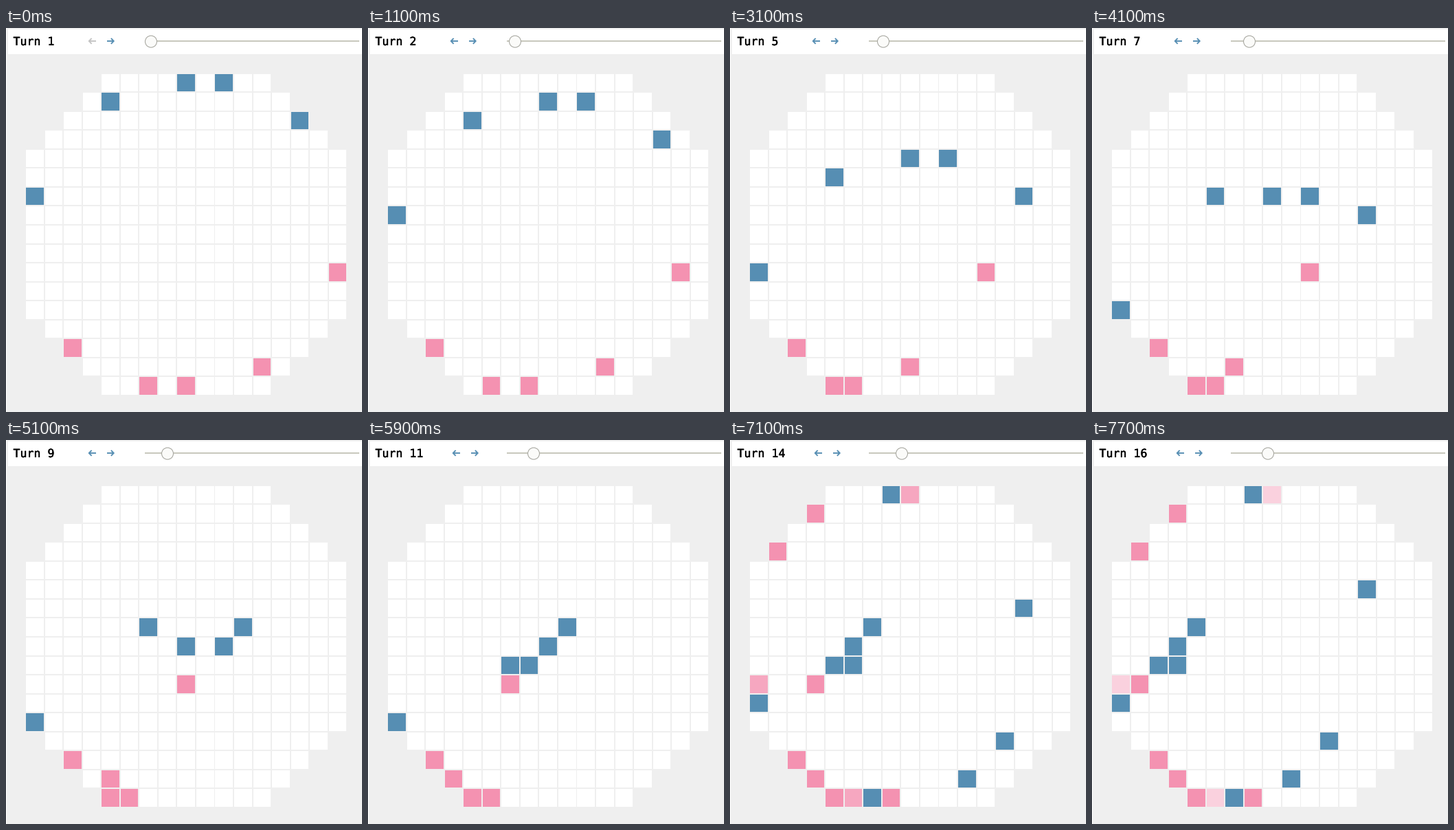
A matplotlib script that plays this animation: 518x558 px, repeating every 8 s.

```python
import matplotlib.pyplot as plt
import matplotlib.patheffects as pe
from matplotlib.animation import FuncAnimation
from matplotlib.collections import PolyCollection
from matplotlib.colors import to_rgb
from matplotlib.patches import Circle, Rectangle

W, H, DPI = 518, 558, 64
PX = 72 / DPI  # points per pixel
STEP_MS, LOOP_MS = 100, 8000
TURN_STARTS = [0, 1100, 1800, 2600, 3100, 3600, 4100, 4600,
               5100, 5500, 5900, 6300, 6700, 7100, 7400, 7700]

GREY, BLUE, PINK = "#efefef", "#568eb3", "#f492b1"
FADED, TRACK = "#c4c4c4", "#c8c8bd"
PITCH, CELL = 27.55, 25.55
LEFT, TOP, SIZE = 29, 66.6, 17

MOVES = {"L": (-1, 0), "R": (1, 0), "U": (0, -1), "D": (0, 1), ".": (0, 0)}

# colour, first turn, column, row, one move per turn, under attack
ROBOTS = [
    (BLUE, 1, 8, 0, "DDDDDDDDDL.LLLL", False),
    (BLUE, 1, 10, 0, "DDDDDDDDLLLLLLL", False),
    (BLUE, 1, 4, 1, "DDDDDRRDDD.LLLL", False),
    (BLUE, 1, 14, 2, "DDDDDLLLLLLLLLL", False),
    (BLUE, 1, 0, 6, "DDDDDD.....U", False),
    (PINK, 1, 16, 10, "L" * 15, False),
    (PINK, 1, 2, 14, "", False),
    (PINK, 1, 12, 15, "L" * 9, False),
    (PINK, 1, 6, 16, "LL", False),
    (PINK, 1, 8, 16, "LLL", True),
    (BLUE, 12, 7, 0, "", False),
    (BLUE, 12, 16, 6, "LLLU", False),
    (BLUE, 12, 15, 13, "LLLL", False),
    (BLUE, 12, 13, 15, "LLLL", False),
    (BLUE, 12, 7, 16, "L", False),
    (PINK, 12, 9, 0, "L", True),
    (PINK, 12, 3, 1, "", False),
    (PINK, 12, 1, 3, "", False),
    (PINK, 12, 0, 10, "", True),
    (PINK, 12, 9, 16, "LL", False),
]

fig = plt.figure(figsize=(W / DPI, H / DPI), dpi=DPI, facecolor="white")
ax = fig.add_axes([0, 0, 1, 1])
ax.set_xlim(0, W)
ax.set_ylim(H, 0)
ax.axis("off")


def box(x, y, w, h, color):
    ax.add_patch(Rectangle((x, y), w, h, color=color, lw=0, antialiased=False))


def in_arena(col, row):
    inset = max(0, 4 - row, row - 12)
    return inset <= col < SIZE - inset


def cell_corners(col, row):
    x, y = LEFT + col * PITCH, TOP + row * PITCH
    x0, x1, y0, y1 = map(round, (x, x + CELL, y, y + CELL))
    return [(x0, y0), (x1, y0), (x1, y1), (x0, y1)]


def arrow():
    style = dict(lw=1.9 * PX, solid_capstyle="butt", solid_joinstyle="miter")
    return [ax.plot([], [], **style)[0] for _ in range(2)]


def place_arrow(lines, tip, way, color):
    shaft, head = lines
    shaft.set_data([tip + way, tip + way * 10.5], [19, 19])
    head.set_data([tip + way * 4.6, tip + way * 0.8, tip + way * 4.6],
                  [15, 19, 23])
    for line in lines:
        line.set_color(color)


# Page and header
box(1, 0, W - 1, H, GREY)
box(3, 2, W - 3, 36, "white")
box(202, 18, 312, 2, TRACK)

# Board
cells = [(c, r) for r in range(SIZE) for c in range(SIZE) if in_arena(c, r)]
board = PolyCollection([cell_corners(*cell) for cell in cells],
                       edgecolors="none", linewidths=0, antialiaseds=False)
ax.add_collection(board, autolim=False)

# Controls
label = ax.text(10.5, 25, "", family="DejaVu Sans Mono", size=16.6 * PX,
                color="black", va="baseline", ha="left")
label.set_path_effects([pe.withStroke(linewidth=0.4 * PX, foreground="black")])
back, forward = arrow(), arrow()
knob = Circle((0, 19.7), 8.5, fc="#fbfbf9", ec="#a9a9a2", lw=1.1 * PX, zorder=5)
ax.add_patch(knob)


def position(col, row, moves):
    for move in moves:
        dx, dy = MOVES[move]
        col, row = col + dx, row + dy
    return col, row


def tint(color, strength):
    return tuple(1 - (1 - v) * strength for v in to_rgb(color))


def draw(frame):
    now = frame * STEP_MS
    turn = sum(start <= now for start in TURN_STARTS)

    colors = dict.fromkeys(cells, to_rgb("white"))
    for color, born, col, row, moves, attacked in ROBOTS:
        if turn >= born:
            hits = max(0, turn - 13) if attacked else 0
            spot = position(col, row, moves[:turn - born])
            colors[spot] = tint(color, 1 - 0.193 * hits)
    board.set_facecolor(list(colors.values()))

    label.set_text(f"Turn {turn}")
    shift = 3 if turn > 9 else 0
    place_arrow(back, 120 + shift, 1, FADED if turn == 1 else BLUE)
    place_arrow(forward, 157.5 + shift, -1, BLUE)
    knob.center = (208 + 3 * turn, 19.7)
    return [board, label, knob, *back, *forward]


anim = FuncAnimation(fig, draw, frames=LOOP_MS // STEP_MS, interval=STEP_MS,
                     repeat=True, repeat_delay=0, blit=False)
plt.show()
```
